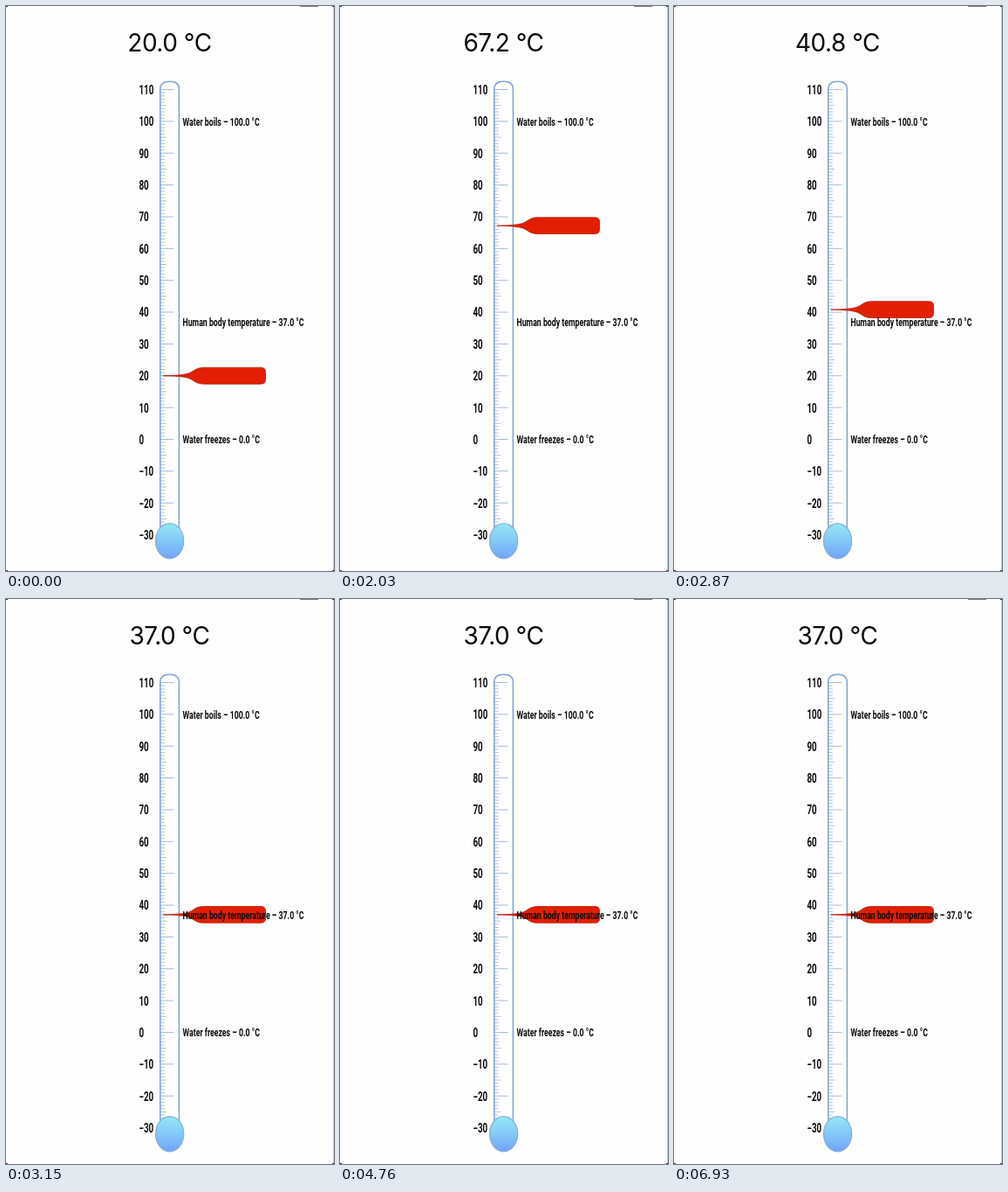
Write an HTML page with a canvas that moves like this. It is 376 by 646 pixels and loops after 7 s.

```html
<!DOCTYPE html>
<html lang="en">
<head>
<meta charset="utf-8">
<title>Thermometer</title>
<style>
  html, body { margin: 0; width: 100%; height: 100%; overflow: hidden; background: #fefefe; }
  canvas { display: block; width: 376px; height: 646px; }
</style>
</head>
<body>
<canvas id="stage"></canvas>
<script>
const W = 376, H = 646, LOOP = 7000, STEP = 70;
const ZERO_Y = 495.5, PX_PER_DEG = 3.636;
const CONDENSE = 0.7;

const canvas = document.getElementById('stage');
const ctx = canvas.getContext('2d');
const dpr = window.devicePixelRatio || 1;
canvas.width = W * dpr;
canvas.height = H * dpr;
ctx.scale(dpr, dpr);

// Drag path: time in ms, temperature in degrees
const drag = [
  [0, 20], [1470, 20], [2030, 67.2], [2170, 71], [2870, 40.8], [3290, 36.4],
  [3960, 36.4], [4130, 37.5], [4270, 37.8], [4620, 37], [LOOP, 37]
];
const notes = [
  ['Water boils', 100], ['Human body temperature', 37], ['Water freezes', 0]
];

const yOf = deg => ZERO_Y - deg * PX_PER_DEG;
const slope = i => (drag[i + 1][1] - drag[i][1]) / (drag[i + 1][0] - drag[i][0]);

// Monotone tangents keep the path from overshooting its points
function tangent(i) {
  if (i === 0 || i === drag.length - 1) return 0;
  const a = slope(i - 1), b = slope(i);
  return a * b > 0 ? 2 * a * b / (a + b) : 0;
}

function degreesAt(t) {
  let i = 0;
  while (i < drag.length - 2 && t >= drag[i + 1][0]) i++;
  const [t0, v0] = drag[i], [t1, v1] = drag[i + 1];
  const d = t1 - t0, u = (t - t0) / d, w = 1 - u;
  return v0 * (1 + 2 * u) * w * w + v1 * u * u * (3 - 2 * u)
    + d * (tangent(i) * u * w * w - tangent(i + 1) * u * u * w);
}

function condensed(text, x, baseline, size) {
  ctx.save();
  ctx.translate(x, baseline);
  ctx.scale(CONDENSE, 1);
  ctx.font = `bold ${size}px Roboto, sans-serif`;
  ctx.fillStyle = '#0b0b0b';
  ctx.textAlign = 'left';
  ctx.fillText(text, 0, 0);
  ctx.restore();
}

function drawTitle(deg) {
  ctx.save();
  ctx.font = '400 28px Inter, sans-serif';
  ctx.letterSpacing = '-0.5px';
  ctx.textAlign = 'center';
  ctx.fillStyle = '#0a0a0a';
  ctx.fillText(deg.toFixed(1) + ' °C', 187.5, 52);
  ctx.restore();
}

function drawTube() {
  ctx.beginPath();
  ctx.moveTo(176.8, 604);
  ctx.lineTo(176.8, 95);
  ctx.bezierCurveTo(176.8, 89, 181, 86.2, 187.6, 86.2);
  ctx.bezierCurveTo(194.2, 86.2, 198.4, 89, 198.4, 95);
  ctx.lineTo(198.4, 604);
  ctx.fillStyle = '#fff';
  ctx.fill();
  ctx.strokeStyle = '#80a5d8';
  ctx.lineWidth = 1.6;
  ctx.stroke();

  ctx.lineWidth = 0.8;
  for (let deg = 110; deg >= -30; deg--) {
    const end = deg % 10 === 0 ? 192.5 : deg % 5 === 0 ? 184 : 181.8;
    ctx.strokeStyle = deg % 10 === 0 ? '#8ea9d4' : '#9cafcf';
    ctx.beginPath();
    ctx.moveTo(177, yOf(deg));
    ctx.lineTo(end, yOf(deg));
    ctx.stroke();
  }
}

function drawBulb() {
  const fill = ctx.createLinearGradient(0, 591, 0, 632);
  fill.addColorStop(0, '#93eaf4');
  fill.addColorStop(0.5, '#83c8f7');
  fill.addColorStop(1, '#72a2f8');
  ctx.beginPath();
  ctx.ellipse(187.6, 611.7, 16.1, 20.1, 0, 0, Math.PI * 2);
  ctx.fillStyle = fill;
  ctx.fill();
  ctx.strokeStyle = '#86aede';
  ctx.lineWidth = 1.2;
  ctx.stroke();
}

function drawPointer(deg) {
  ctx.save();
  ctx.translate(0, yOf(deg));
  ctx.beginPath();
  ctx.moveTo(180, 0);
  ctx.bezierCurveTo(204, -0.5, 209, -2, 214, -5);
  ctx.bezierCurveTo(218, -8, 221, -9.4, 228, -9.4);
  ctx.lineTo(292, -9.4);
  ctx.quadraticCurveTo(297.5, -9.4, 297.5, -4.5);
  ctx.lineTo(297.5, 4.5);
  ctx.quadraticCurveTo(297.5, 9.4, 292, 9.4);
  ctx.lineTo(228, 9.4);
  ctx.bezierCurveTo(221, 9.4, 218, 8, 214, 5);
  ctx.bezierCurveTo(209, 2, 204, 0.5, 180, 0);
  ctx.closePath();
  ctx.fillStyle = '#e21f02';
  ctx.fill();
  ctx.strokeStyle = '#b41c08';
  ctx.lineWidth = 0.8;
  ctx.stroke();
  ctx.restore();
}

function drawScreenEdge() {
  ctx.fillStyle = '#c4c4c4';
  ctx.fillRect(375, 0, 1, H);
  ctx.fillStyle = '#777';
  ctx.fillRect(337, 0, 21, 1);
  ctx.fillStyle = '#333';
  for (const x of [0, W - 2]) {
    ctx.fillRect(x, 0, 2, 1);
    ctx.fillRect(x, H - 1, 2, 1);
  }
}

function draw(t) {
  const deg = degreesAt(t);
  ctx.fillStyle = '#fefefe';
  ctx.fillRect(0, 0, W, H);
  drawScreenEdge();
  drawTitle(deg);
  drawTube();
  drawBulb();
  for (let mark = -30; mark <= 110; mark += 10) {
    condensed(String(mark).replace('-', '−'), 152.5, yOf(mark) + 5.4, 14);
  }
  drawPointer(deg);
  for (const [name, at] of notes) {
    condensed(`${name} – ${at.toFixed(1)} °C`, 202.5, yOf(at) + 4.6, 12.5);
  }
}

const start = performance.now();
function tick() {
  const t = (performance.now() - start) % LOOP;
  draw(Math.floor(t / STEP) * STEP);
  requestAnimationFrame(tick);
}
tick();
</script>
</body>
</html>
```
